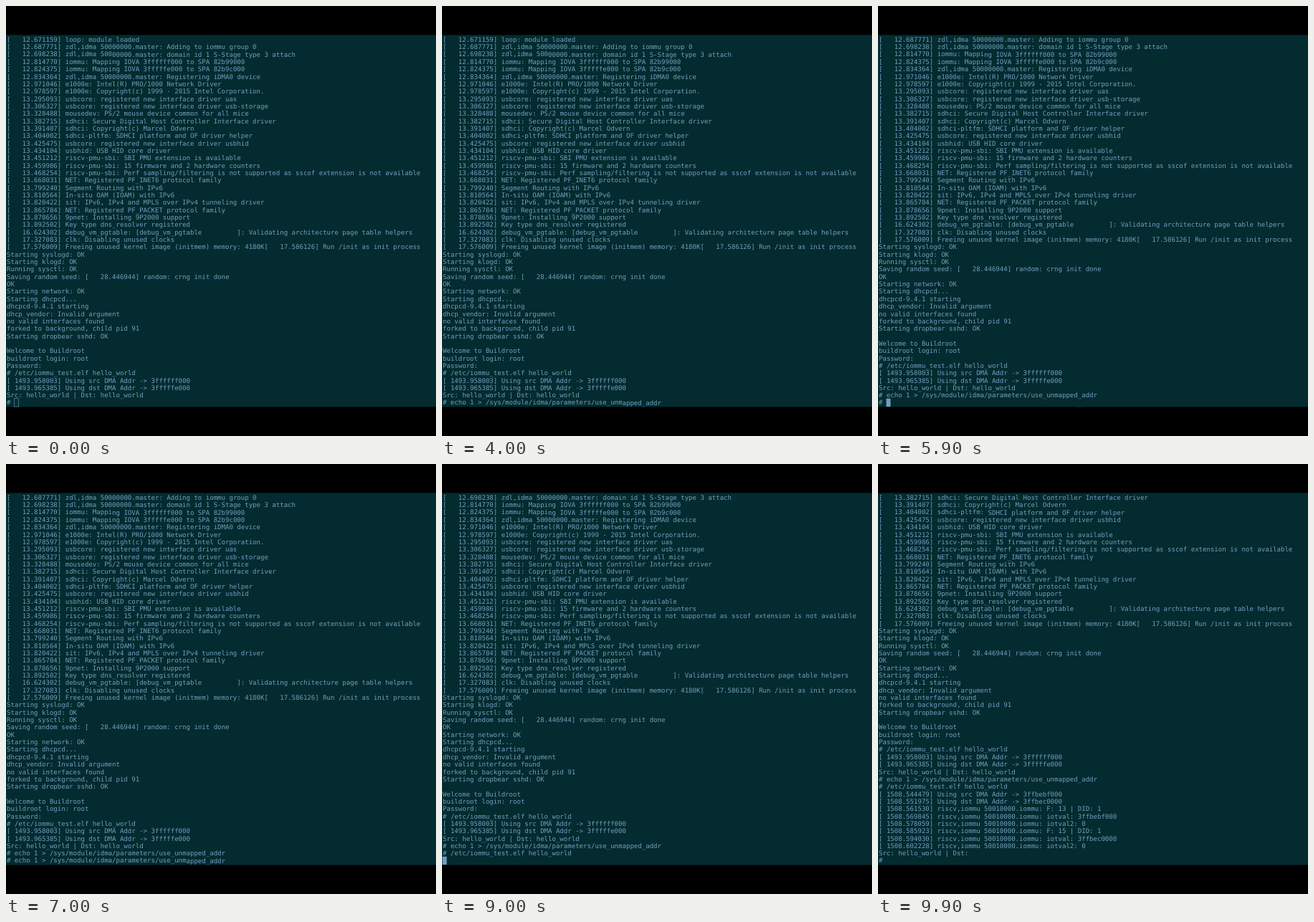
Animation, 600 px wide and 600 px high, one loop 10 s. Source, as an HTML page:

```html
<!DOCTYPE html>
<html lang="en">
<head>
<meta charset="utf-8">
<title>Terminal session</title>
<style>
  html, body { margin: 0; width: 100%; height: 100%; overflow: hidden; background: #000; }
  #stage { position: relative; width: 600px; height: 600px; overflow: hidden; background: #000; }
  svg { position: absolute; left: 0; top: 0; }
  .screen { fill: #042b2f; }
  /* The minute rotation keeps baselines off the pixel grid. */
  #text {
    position: absolute; left: .6px; top: 41.5px; margin: 0;
    font: 40px/45.72px "DejaVu Sans Mono", monospace;
    text-rendering: geometricPrecision;
    font-variant-ligatures: none;
    color: #719fc0; white-space: pre;
    transform: rotate(.002deg) scale(.22615); transform-origin: 0 0;
  }
  #cursor { fill: none; }
  #cursor.block { fill: #719fc0; }
  #cursor.hollow { stroke: #719fc0; stroke-width: .6; }
</style>
</head>
<body>
<div id="stage">
  <svg width="600" height="600">
    <rect class="screen" y="40.4" width="600" height="519"/>
    <rect id="cursor" y="547.8" width="6" height="11.3"/>
  </svg>
  <pre id="text"></pre>
</div>
<script>
const ECHO = '# echo 1 > /sys/module/idma/parameters/use_unmapped_addr';
const TEST = '# /etc/iommu_test.elf hello_world';

const log = `[   12.671159] loop: module loaded
[   12.687771] zdl,idma 50000000.master: Adding to iommu group 0
[   12.698238] zdl,idma 50000000.master: domain id 1 S-Stage type 3 attach
[   12.814770] iommu: Mapping IOVA 3ffffff000 to SPA 82b99000
[   12.824375] iommu: Mapping IOVA 3fffffe000 to SPA 82b9c000
[   12.834364] zdl,idma 50000000.master: Registering iDMA0 device
[   12.971046] e1000e: Intel(R) PRO/1000 Network Driver
[   12.978597] e1000e: Copyright(c) 1999 - 2015 Intel Corporation.
[   13.295093] usbcore: registered new interface driver uas
[   13.306327] usbcore: registered new interface driver usb-storage
[   13.328488] mousedev: PS/2 mouse device common for all mice
[   13.382715] sdhci: Secure Digital Host Controller Interface driver
[   13.391407] sdhci: Copyright(c) Marcel Odvern
[   13.404002] sdhci-pltfm: SDHCI platform and OF driver helper
[   13.425475] usbcore: registered new interface driver usbhid
[   13.434104] usbhid: USB HID core driver
[   13.451212] riscv-pmu-sbi: SBI PMU extension is available
[   13.459986] riscv-pmu-sbi: 15 firmware and 2 hardware counters
[   13.468254] riscv-pmu-sbi: Perf sampling/filtering is not supported as sscof extension is not available
[   13.668031] NET: Registered PF_INET6 protocol family
[   13.799240] Segment Routing with IPv6
[   13.810564] In-situ OAM (IOAM) with IPv6
[   13.820422] sit: IPv6, IPv4 and MPLS over IPv4 tunneling driver
[   13.865784] NET: Registered PF_PACKET protocol family
[   13.878656] 9pnet: Installing 9P2000 support
[   13.892502] Key type dns_resolver registered
[   16.624302] debug_vm_pgtable: [debug_vm_pgtable         ]: Validating architecture page table helpers
[   17.327083] clk: Disabling unused clocks
[   17.576009] Freeing unused kernel image (initmem) memory: 4180K[   17.586126] Run /init as init process
Starting syslogd: OK
Starting klogd: OK
Running sysctl: OK
Saving random seed: [   28.446944] random: crng init done
OK
Starting network: OK
Starting dhcpcd...
dhcpcd-9.4.1 starting
dhcp_vendor: Invalid argument
no valid interfaces found
forked to background, child pid 91
Starting dropbear sshd: OK

Welcome to Buildroot
buildroot login: root
Password:
${TEST}
[ 1493.958003] Using src DMA Addr -> 3ffffff000
[ 1493.965385] Using dst DMA Addr -> 3fffffe000
Src: hello_world | Dst: hello_world
${ECHO}
${TEST}
[ 1508.544479] Using src DMA Addr -> 3ffbebf000
[ 1508.551975] Using dst DMA Addr -> 3ffbec0000
[ 1508.561530] riscv,iommu 50010000.iommu: F: 13 | DID: 1
[ 1508.569845] riscv,iommu 50010000.iommu: iotval: 3ffbebf000
[ 1508.578059] riscv,iommu 50010000.iommu: iotval2: 0
[ 1508.585923] riscv,iommu 50010000.iommu: F: 15 | DID: 1
[ 1508.594030] riscv,iommu 50010000.iommu: iotval: 3ffbec0000
[ 1508.602228] riscv,iommu 50010000.iommu: iotval2: 0
Src: hello_world | Dst: `.split('\n');

const LOOP = 10000, ROWS = 50, LEFT = 0.6, CELL = 5.446;
const cut = n => TEST.slice(0, TEST.length - n);

// [start ms, log lines printed, input line, cursor style]
const steps = [
  [0, 49, '# ', 'hollow'],
  [1100, 49, '# ', 'block'],
  [1600, 49, '# ', ''],
  [2200, 49, TEST, 'block'],
  [2300, 49, ECHO, 'block'],
  [2800, 49, ECHO, ''],
  [3400, 49, ECHO, 'block'],
  [4000, 49, ECHO, ''],
  [4500, 50, '', 'block'],
  [4600, 50, '# ', 'block'],
  [5100, 50, '# ', ''],
  [5700, 50, '# ', 'block'],
  [6300, 50, '# ', ''],
  [6400, 50, ECHO, 'block'],
  [7000, 50, ECHO, ''],
  [7400, 50, TEST, 'block'],
  [7800, 50, cut(1), 'block'],
  [7900, 50, cut(2), 'block'],
  [8000, 50, cut(4), 'block'],
  [8100, 50, cut(5), 'block'],
  [8400, 50, cut(3), 'block'],
  [8500, 50, cut(1), 'block'],
  [8600, 50, TEST, 'block'],
  [9000, 51, '', 'block'],
  [9200, 59, '', 'block'],
  [9300, 60, '# ', 'block'],
  [9800, 60, '# ', '']
];

const text = document.getElementById('text');
const cursor = document.getElementById('cursor');
let shown = null;

function show([, printed, input, style]) {
  text.textContent = [...log.slice(printed - ROWS + 1, printed), input].join('\n');
  cursor.setAttribute('class', style);
  cursor.setAttribute('x', LEFT + input.length * CELL);
}

const start = performance.now();
function tick() {
  const t = (performance.now() - start) % LOOP;
  const step = steps.findLast(s => s[0] <= t);
  if (step !== shown) show(shown = step);
  requestAnimationFrame(tick);
}
tick();
</script>
</body>
</html>
```
